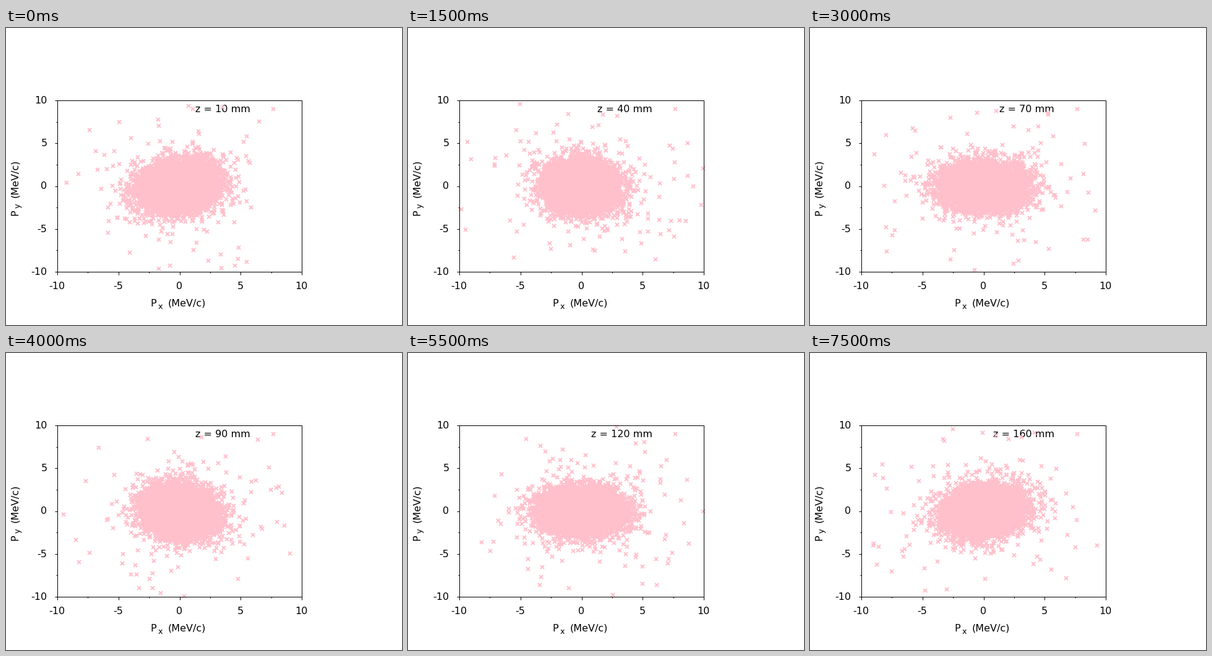
These frames come from a looping animation (640 px wide and 480 px high, 8 s). A matplotlib script:

```python
import numpy as np
import matplotlib.pyplot as plt
from matplotlib.animation import FuncAnimation

plt.rcParams["font.family"] = "DejaVu Sans"
W, H, DPI = 640, 480, 100
PX = 72 / DPI                                  # points per pixel
LEFT, RIGHT, TOP, BOTTOM = 83, 478, 117, 394
STEPS, N_BEAM, N_HALO = 16, 10000, 72

fig = plt.figure(figsize=(W / DPI, H / DPI), dpi=DPI, facecolor="white")
ax = fig.add_axes([LEFT / W, 1 - BOTTOM / H,
                   (RIGHT - LEFT) / W, (BOTTOM - TOP) / H])
ax.set(xlim=(-10, 10), ylim=(-10, 10))
ax.patch.set_visible(False)


def label(x, y, text, size=16, **kw):
    return fig.text(x / W, 1 - y / H, text, fontsize=size * PX, color="black",
                    va="baseline", **kw)


def axis_title(place, sub):
    """Place 'P', its subscript and the unit along one axis."""
    for offset, drop, text, size in ((-47.2, 0, "P", 16), (-34.7, 4, sub, 12.8),
                                     (-18.4, 0, "(MeV/c)", 16)):
        place(offset, drop, text, size)


def style_axes():
    minor = np.arange(-7.5, 10, 5)
    for axis in (ax.xaxis, ax.yaxis):
        axis.set_ticks(range(-10, 11, 5), labels=[])
        axis.set_ticks(minor, minor=True)
    ax.tick_params(which="major", length=4.5 * PX, width=PX)
    ax.tick_params(which="minor", length=2.5 * PX, width=PX)
    for spine in ax.spines.values():
        spine.set(linewidth=PX, zorder=5)
    for v in range(-10, 11, 5):
        t = (v + 10) / 20
        label(LEFT + t * (RIGHT - LEFT) - 0.5, 422, str(v), ha="center")
        label(66.5, BOTTOM - t * (BOTTOM - TOP) + 5, str(v), ha="right")
    axis_title(lambda o, d, s, size: label(280.5 + o, 450 + d, s, size), "x")
    axis_title(lambda o, d, s, size: label(19 + d, 256 - o, s, size, rotation=90,
                                           rotation_mode="anchor"), "y")


def beam(z):
    """Particles of a tilted beam that breathes and turns every 50 mm."""
    rng = np.random.default_rng(z)
    phase = 2 * np.pi * (z - 20) / 50
    sx = 1.30 + 0.09 * np.cos(phase)
    sy = 1.21 - 0.05 * np.cos(phase)
    tilt = -0.17 * np.sin(phase)

    u, v = rng.standard_normal((2, N_BEAM))
    spread = np.where(rng.random(N_BEAM) < 0.11, 1.5, 1.0)
    core = spread * [sx * u, sy * (tilt * u + np.sqrt(1 - tilt ** 2) * v)]

    r = 4.5 + 6.5 * rng.random(N_HALO) ** 1.2
    a = rng.uniform(0, 2 * np.pi, N_HALO)
    halo = r * np.array([np.cos(a), np.sin(a)])

    points = np.hstack([core, halo])
    return points[:, (abs(points) < 10).all(axis=0)]


style_axes()
key = label(394.5, 136, "", ha="right", zorder=-1)
cross = dict(ls="none", marker="x", ms=5.2 * PX, mew=2 * PX, color="pink",
             clip_on=False, zorder=2)
ax.plot([7.67], [8.99], **cross)
dots, = ax.plot([], [], **cross)


def update(i):
    z = 10 * (i + 1)
    dots.set_data(*beam(z))
    key.set_text(f"z = {z} mm")
    return dots, key


anim = FuncAnimation(fig, update, frames=STEPS, interval=500,
                     repeat=True, repeat_delay=0, blit=False)
plt.show()
```
